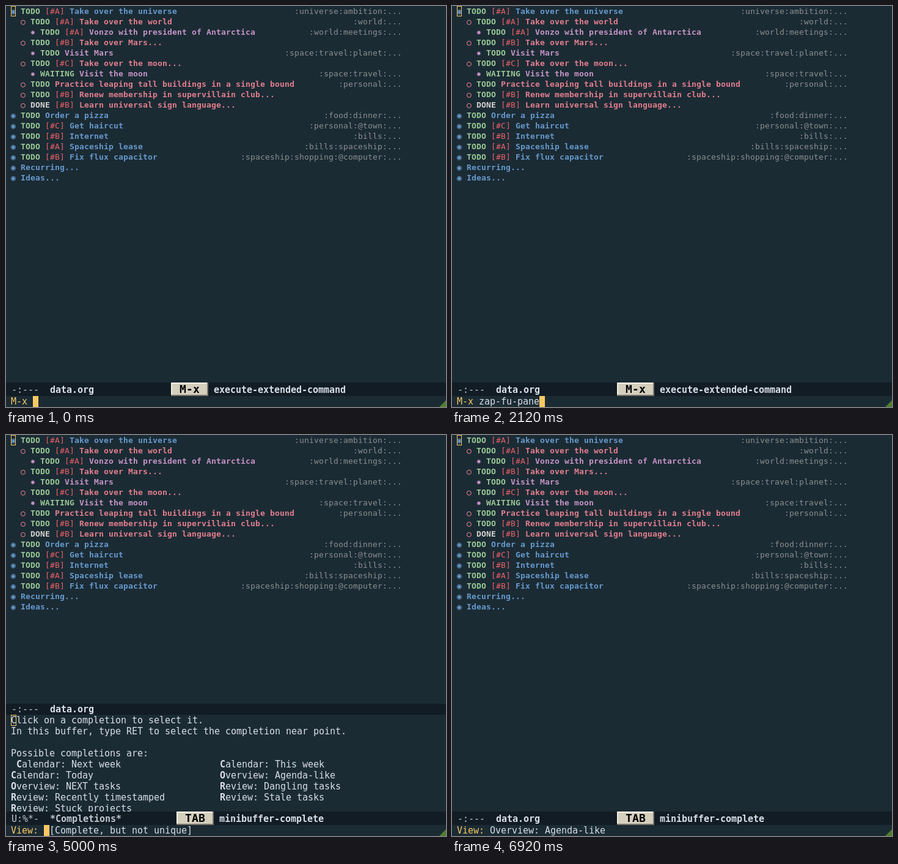
Write an HTML page with a canvas that moves like this. It is 720 by 655 pixels and loops after 8000 ms.

```html
<!DOCTYPE html>
<html lang="en">
<head>
<meta charset="utf-8">
<title>Outline editor</title>
<style>
html, body { margin: 0; width: 100%; height: 100%; overflow: hidden; background: #1b2b34; }
canvas { display: block; }
</style>
</head>
<body>
<canvas id="stage" width="720" height="655"></canvas>
<script>
const ctx = document.getElementById('stage').getContext('2d');
const LOOP = 8000;
const BG = '#1b2b34', BAR = '#111c24', TEXT = '#d8dee9', YELLOW = '#fac863';
const GREEN = '#99c794', RED = '#ec5f67', GREY = '#8b8f92';
const LEVELS = [['◉', '#6699cc'], ['○', '#e27e8d'], ['✸', '#c594c5']];
const PITCH = { 13: 8, 15: 9, 18: 11 };

// level | keyword | priority | title | tags
const outline = `1|TODO|A|Take over the universe|:universe:ambition:...
2|TODO|A|Take over the world|:world:...
3|TODO|A|Vonzo with president of Antarctica|:world:meetings:...
2|TODO|B|Take over Mars...|
3|TODO||Visit Mars|:space:travel:planet:...
2|TODO|C|Take over the moon...|
3|WAITING||Visit the moon|:space:travel:...
2|TODO||Practice leaping tall buildings in a single bound|:personal:...
2|TODO|B|Renew membership in supervillain club...|
2|DONE|B|Learn universal sign language...|
1|TODO||Order a pizza|:food:dinner:...
1|TODO|C|Get haircut|:personal:@town:...
1|TODO|B|Internet|:bills:...
1|TODO|A|Spaceship lease|:bills:spaceship:...
1|TODO|B|Fix flux capacitor|:spaceship:shopping:@computer:...
1|||Recurring...|
1|||Ideas...|`.split('\n').map(line => line.split('|'));

const completions = [
  ['Calendar: Next week', 'Calendar: This week'],
  ['Calendar: Today', 'Overview: Agenda-like'],
  ['Overview: NEXT tasks', 'Review: Dangling tasks'],
  ['Review: Recently timestamped', 'Review: Stale tasks'],
  ['Review: Stuck projects']
];

function rect(x, y, w, h, color) {
  ctx.fillStyle = color;
  ctx.fillRect(x, y, w, h);
}

function frame(x, y, w, h) {
  ctx.strokeStyle = YELLOW;
  ctx.lineWidth = 1;
  ctx.strokeRect(x + .5, y + .5, w - 1, h - 1);
}

// Writes on the character grid and returns the x after the last cell.
function write(text, x, y, color, size = 15, bold = false) {
  ctx.font = `${bold ? 'bold ' : ''}${size}px "DejaVu Sans Mono", monospace`;
  ctx.fillStyle = color;
  for (const ch of text) {
    ctx.fillText(ch, x, y);
    x += PITCH[size];
  }
  return x;
}

function drawOutline() {
  outline.forEach(([level, keyword, priority, title, tags], row) => {
    const y = row * 17 + 13;
    const [bullet, color] = LEVELS[level - 1];
    let x = write(bullet + ' ', 16 * level - 8, y, color, 13, true);
    if (keyword) x = write(keyword + ' ', x, y, keyword === 'DONE' ? '#d4d0cc' : GREEN, 13, true);
    if (priority) x = write(`[#${priority}] `, x, y, RED, 13);
    write(title, x, y, color, 13, true);
    write(tags, 648 - tags.length * 8, y, GREY, 13);
  });
  frame(8, 0, 8, 17);
}

function drawBar(y, h, flags, name, color = TEXT) {
  rect(0, y, 720, h, BAR);
  const base = y + (h > 18 ? 17 : 14);
  write(flags, 9, base, '#c0c5ce');
  write(name, 72, base, color, 15, true);
}

function drawKey(x, key, command) {
  rect(x, 615, 61, 22, '#7d776d');
  rect(x, 615, 59, 20, '#f2eee2');
  rect(x + 2, 617, 57, 18, '#d5cfbe');
  write(key, x + 14, 632, '#000', 18, true);
  write(command, x + 70, 632, TEXT, 15, true);
}

function drawCompletions() {
  rect(0, 439, 720, 176, BG);
  drawBar(439, 18, '-:---', 'data.org');
  write('Click on a completion to select it.', 8, 471, TEXT);
  write('In this buffer, type RET to select the completion near point.', 8, 489, TEXT);
  write('Possible completions are:', 8, 525, TEXT);
  completions.forEach((pair, row) => pair.forEach((item, col) => {
    const x = col ? 350 : row ? 8 : 17;
    const y = 543 + row * 18;
    write(item[0], x, y, TEXT, 15, true);
    write(item.slice(1), x + 9, y, TEXT);
  }));
  frame(8, 457, 9, 18);
}

function drawPrompt(prompt, input, cursor, message = '') {
  rect(0, 637, 720, 18, BG);
  let x = write(prompt, 8, 651, YELLOW);
  x = write(input, x, 651, TEXT);
  if (cursor) rect(x, 637, 9, 18, YELLOW);
  write(message, x + 9, 651, TEXT);
}

function stateAt(t) {
  if (t < 3220) {
    const typed = t < 1120 ? 0 : Math.floor((t - 1020) / 100);
    return { key: 'M-x', command: 'execute-extended-command', prompt: 'M-x ',
      input: 'zap-fu-pane'.slice(0, typed), cursor: true };
  }
  const state = { prompt: 'View: ', input: '', cursor: true };
  if (t < 5000) {
    state.key = 'RET';
    state.command = 'minibuffer-complete-and-exit';
  } else {
    state.key = 'TAB';
    state.command = 'minibuffer-complete';
  }
  if (t >= 4240 && t < 5760) state.message = '[Complete, but not unique]';
  state.listed = t >= 5000 && t < 5960;
  if (t >= 5760) state.input = t < 5860 ? 'O' : 'Ov';
  if (t >= 5960) state.input = 'Overview: ';
  if (t >= 6720) state.input += t < 6820 ? 'A' : t < 6920 ? 'Ag' : 'Agenda-like';
  state.cursor = t < 5960 || (t >= 6720 && t < 6920);
  return state;
}

function draw(t) {
  const s = stateAt(t);
  rect(0, 0, 720, 655, BG);
  drawOutline();
  if (s.listed) drawCompletions();
  if (s.listed) drawBar(615, 22, 'U:%*-', '*Completions*', '#c0c5ce');
  else drawBar(615, 22, '-:---', 'data.org');
  drawKey(s.listed ? 279 : 270, s.key, s.command);
  drawPrompt(s.prompt, s.input, s.cursor, s.message);
  ctx.fillStyle = '#4f7f2c';
  ctx.beginPath();
  ctx.moveTo(720, 644);
  ctx.lineTo(720, 655);
  ctx.lineTo(709, 655);
  ctx.fill();
}

const start = performance.now();
function tick() {
  draw((performance.now() - start) % LOOP);
  requestAnimationFrame(tick);
}
tick();
</script>
</body>
</html>
```
